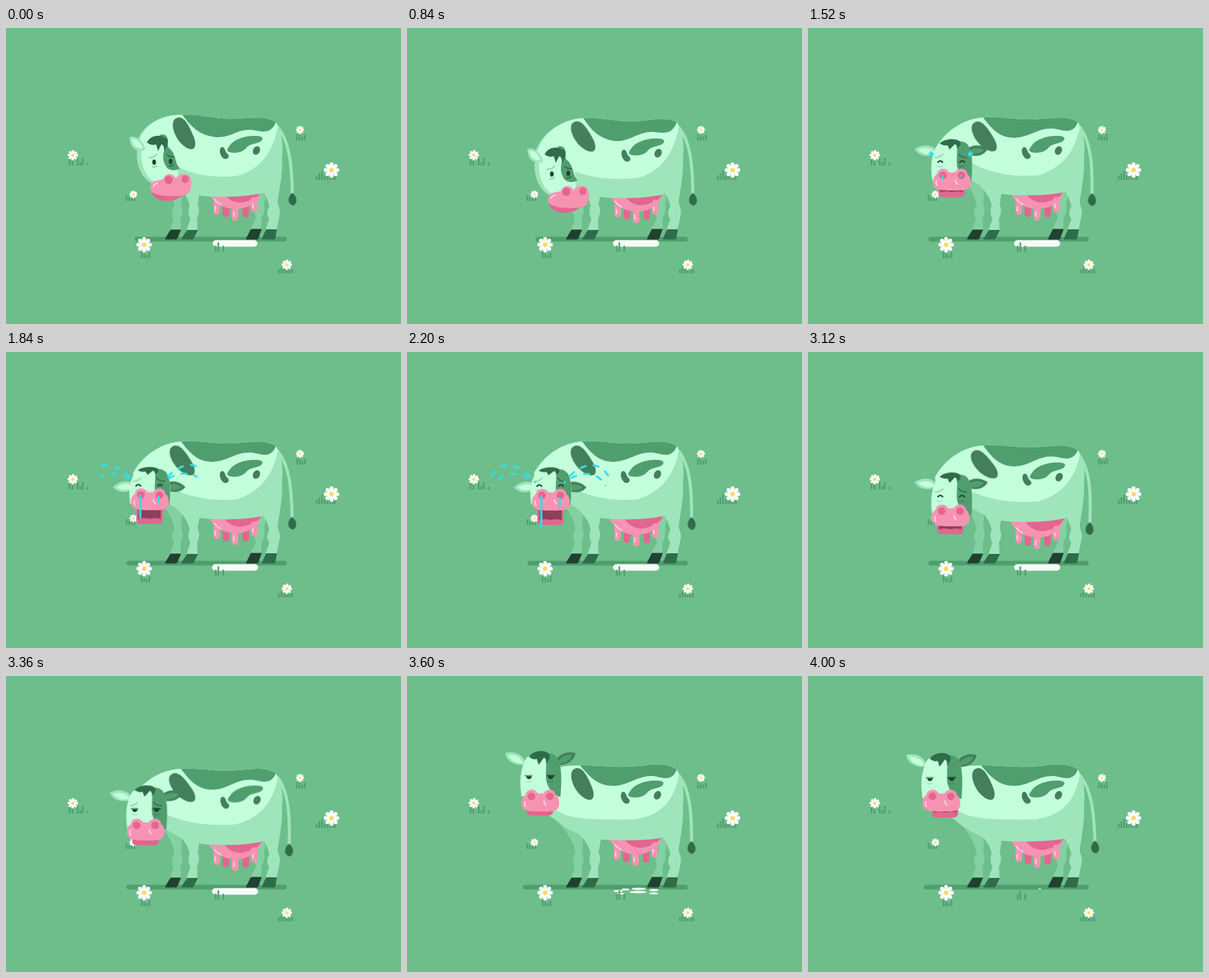
These frames come from a looping animation (600 px wide and 450 px high, 4.04 s). An HTML page without scripts:

```html
<!DOCTYPE html>
<html lang="en">
<head>
<meta charset="utf-8">
<title>Sad cow</title>
<style>
html, body { margin: 0; width: 100%; height: 100%; overflow: hidden; background: #6dbe8a; }
svg { display: block; width: 600px; height: 450px; }
:root { --light: #c4ffdc; --mid: #9fe5bb; --far: #83d1a3; --spot: #509e6e; --deep: #427f5a; --dark: #2f6c49; --ink: #20412f; --pink: #f693b3; --rose: #e2668f; --tear: #2fe0ea; }
.light { fill: var(--light); } .mid { fill: var(--mid); } .far { fill: var(--far); }
.spot { fill: var(--spot); } .deep { fill: var(--deep); } .dark { fill: var(--dark); } .ink { fill: var(--ink); }
.pink { fill: var(--pink); } .rose { fill: var(--rose); } .milk { fill: #f8fcf9; }
.line { fill: none; stroke-linecap: round; }
.grass { fill: none; stroke: var(--spot); stroke-width: 2.4; }
.shine { fill: none; stroke: #ffd3e2; stroke-width: 2; stroke-linecap: round; }

.anim, .anim * { animation: 0s ease-in-out infinite; }
.anim .a { animation-duration: 4.04s; }
.anim .step { animation-timing-function: step-end; }

/* body outline, lit flank and saddle share the same back curve */
.hull { animation-name: hull !important; }
.lit { animation-name: lit !important; }
.saddle { animation-name: saddle !important; }
@keyframes hull {
  0%, 13.9% { d: path("M410 143C388 130 362 140 335 138C310 136 290 131 268 132C237 131 209 146 200 170C194 195 215 230 247 236C262 244 275 254 305 256C345 258 375 255 392 250C414 245 427 190 416 154Z"); }
  20.8% { d: path("M410 143C388 132 362 144 335 142C310 141 290 136 268 137C237 138 205 158 195 188C190 212 215 236 247 242C262 248 275 256 305 258C345 260 375 257 392 252C414 247 427 190 416 154Z"); }
  27.7%, 70.3% { d: path("M410 143C388 130 362 140 335 139C310 139 290 134 266 136C241 138 212 151 193 184C190 206 215 226 247 231C262 239 275 251 305 253.500C345 256 375 253 392 249C414 245 427 190 416 154Z"); }
  77.2%, 81.7% { d: path("M410 149C388 136 362 146 335 145C310 145 290 140 266 142C241 144 212 157 193 190C190 214 215 232 247 236C262 244 275 255 305 257.500C345 260 375 257 392 252C414 247 427 194 416 159Z"); }
  87%, 90% { d: path("M410 142C388 128 362 138 335 138C310 139 290 136 263 136C235 136 205 140 195 165C192 190 203 206 222 216C240 232 265 247 300 249C345 251 375 249 392 245C414 241 427 190 416 154Z"); }
  99%, 100% { d: path("M410 142C388 128 362 138 335 138C310 139 290 136 263 136C235 136 205 140 195 165C192 190 203 206 222 218C240 234 265 249 300 251C345 253 375 250 392 247C414 242 427 190 416 154Z"); }
}
@keyframes lit {
  0%, 13.9% { d: path("M410 143C388 130 362 140 335 138C310 136 290 131 268 132C237 131 211 146 203 170C200 190 225 205 258 209C285 224 315 228 350 225C382 217 405 193 413 150Z"); }
  20.8% { d: path("M410 143C388 132 362 144 335 142C310 141 290 136 268 137C237 138 207 158 198 188C198 205 225 215 258 219C285 229 315 231 350 228C382 220 405 194 413 150Z"); }
  27.7%, 70.3% { d: path("M410 143C388 130 362 140 335 139C310 139 290 134 266 136C241 138 212 151 193 184C195 198 225 204 250 206C280 222 315 227 350 224C382 214 405 192 413 150Z"); }
  77.2%, 81.7% { d: path("M410 149C388 136 362 146 335 145C310 145 290 140 266 142C241 144 212 157 193 190C195 206 225 211 250 213C280 226 315 230 350 227C382 218 405 196 413 156Z"); }
  87%, 100% { d: path("M410 142C388 128 362 138 335 138C310 139 290 136 263 136C235 136 205 140 195 165C195 190 212 200 230 206C250 219 300 219 345 218C384 213 405 192 413 150Z"); }
}
@keyframes saddle {
  0%, 13.9% { d: path("M268 132C290 131 310 136 335 138C362 140 388 130 410 143C402 163 388 157 374 155C352 153 342 167 320 166C296 164 282 152 268 132Z"); }
  20.8% { d: path("M268 137C290 136 310 141 335 142C362 144 388 132 410 143C402 164 388 159 374 158C352 157 340 172 318 172C294 170 280 156 268 137Z"); }
  27.7%, 70.3% { d: path("M266 136C290 134 310 139 335 139C362 140 388 130 410 143C402 163 388 155 374 153C350 151 338 166 314 167C290 167 278 152 266 136Z"); }
  77.2%, 81.7% { d: path("M266 142C290 140 310 145 335 145C362 146 388 136 410 149C402 168 388 161 374 159C350 157 338 173 314 174C290 174 278 158 266 142Z"); }
  87%, 100% { d: path("M263 136C290 136 310 139 335 138C362 138 388 128 410 142C402 162 388 154 374 152C350 151 338 166 314 167C290 167 278 154 263 136Z"); }
}
.neckspot { animation-name: neckspot !important; }
@keyframes neckspot {
  0%, 13.9% { transform: translate(0, 0); }
  20.8% { transform: translate(-3px, 5px) rotate(-6deg); }
  27.7%, 70.3% { transform: translate(-3px, 5px) rotate(-8deg); }
  77.2%, 81.7% { transform: translate(-3px, 11px) rotate(-14deg); }
  87%, 100% { transform: translate(-4px, 4px); }
}
.spots { animation-name: spots !important; }
@keyframes spots {
  0%, 13.9%, 27.7%, 70.3% { transform: translate(0, 0); }
  20.8%, 77.2%, 81.7% { transform: translate(1px, 4px); }
  87%, 100% { transform: translate(0, -5px); }
}
.udder { animation-name: udder !important; }
@keyframes udder {
  0%, 13.9% { transform: translate(0, 0); }
  20.8% { transform: translate(0, 4px); }
  27.7%, 42.6% { transform: translate(0, 0); }
  54.5% { transform: translate(0, 3px); }
  70.3% { transform: translate(0, 1px); }
  77.2%, 81.7% { transform: translate(0, 7px); }
  86% { transform: translate(0, -7px); }
  89.1% { transform: translate(-1px, -4px); }
  93.1% { transform: translate(0, 1px); }
  99%, 100% { transform: translate(0, -1px); }
}
.tail { transform-origin: 414px 152px; animation-name: tail !important; }
@keyframes tail {
  0% { transform: rotate(0deg); } 9% { transform: rotate(1.8deg); }
  20.8% { transform: rotate(.4deg); } 26% { transform: rotate(-1.2deg); }
  37.6% { transform: rotate(2deg); } 46% { transform: rotate(.2deg); }
  54.5% { transform: rotate(1.5deg); } 65% { transform: rotate(-.8deg); }
  77.2% { transform: rotate(3.7deg) translateY(7px); } 89.1% { transform: rotate(1.6deg); }
  95% { transform: rotate(-1.2deg); } 99%, 100% { transform: rotate(-.5deg); }
}

.shade { animation-name: shade !important; }
@keyframes shade {
  0% { x: 195.5px; width: 231px; } 24.8% { x: 183px; width: 243.5px; } 85% { x: 176px; width: 250.5px; }
}
.pool { transform-origin: 348px 327px; animation-name: pool !important; }
@keyframes pool {
  0% { transform: scaleX(1); opacity: 1; } 13.9%, 84% { transform: scaleX(1.03); opacity: 1; }
  84.01%, 100% { opacity: 0; }
}
.bits ellipse { transform-box: fill-box; transform-origin: center; animation-name: bits; }
@keyframes bits {
  0%, 83.9% { transform: scale(0); } 84% { transform: scale(1.25, 1.8); }
  89.1% { transform: scale(1); } 98%, 100% { transform: scale(0); }
}
.bits .last { animation-name: last; }
@keyframes last {
  0%, 83.9% { transform: scale(0); } 84% { transform: scale(1.25, 1.8); }
  89.1% { transform: scale(1); } 99%, 100% { transform: scale(.2, .5); }
}

/* side head looks down, then turns to the front */
.side { animation-name: side !important; }
@keyframes side {
  0% { transform: translate(0, 0); } 6% { transform: translate(0, 2px); } 13.9% { transform: translate(0, 1px); }
  20.8% { transform: translate(-5px, 18px); } 23.8%, 100% { transform: translate(-11px, 24px); }
}
.showside { animation-name: showside !important; }
.showfront { animation-name: showfront !important; }
@keyframes showside { 0% { visibility: visible; } 23.8%, 100% { visibility: hidden; } }
@keyframes showfront { 0% { visibility: hidden; } 23.8%, 100% { visibility: visible; } }

.front { animation-name: front !important; }
@keyframes front {
  0%, 23.7% { transform: translate(25px, 60px); } 27.7% { transform: translate(16px, 57px); }
  32% { transform: translate(15px, 51px); } 37.6% { transform: translate(15px, 47px); }
  42.6% { transform: translate(15px, 50px); } 46.5% { transform: translate(15px, 46px); }
  50.5% { transform: translate(15px, 49px); } 54.5% { transform: translate(15px, 47px); }
  58.4% { transform: translate(15px, 50px); } 62.4% { transform: translate(15px, 46px); }
  66.3% { transform: translate(15px, 49px); } 70.3% { transform: translate(15px, 48px); }
  77.2% { transform: translate(15px, 63px); } 81.7% { transform: translate(14px, 65px); }
  86.1% { transform: translate(-1px, -10px); } 89.1% { transform: translate(0, -3px); }
  93.1% { transform: translate(0, 2px); } 99%, 100% { transform: translate(0, 0); }
}
.skull { transform-origin: 203px 180px; animation-name: skull !important; }
@keyframes skull {
  0%, 37.6% { transform: scaleY(.92); } 42.6%, 70.3% { transform: scaleY(.82); }
  77.2%, 81.7% { transform: scaleY(.95); } 86%, 100% { transform: scaleY(1); }
}
.hair { transform-origin: 203px 117px; animation-name: hair !important; }
@keyframes hair {
  0%, 37.6% { transform: scaleY(.82); } 42.6%, 70.3% { transform: scaleY(.7); }
  77.2%, 81.7% { transform: scaleY(.8); } 86%, 100% { transform: scaleY(1); }
}
.ear { transform-origin: 178px 137px; animation-name: ear !important; }
@keyframes ear {
  0%, 37.6% { transform: translate(2px, 6px) rotate(-20deg); }
  42.6%, 70.3% { transform: translate(3px, 22px) rotate(-30deg); }
  77.2%, 81.7% { transform: translate(2px, 4px) rotate(-20deg); }
  86.1% { transform: rotate(5deg); } 89.1%, 100% { transform: rotate(0deg); }
}
.muzzle { animation-name: muzzle !important; }
@keyframes muzzle {
  0%, 37.6% { transform: translate(1px, -6px); } 42.6%, 70.3% { transform: translate(1px, -12px); }
  77.2%, 81.7% { transform: translate(-1px, -4px); } 86% { transform: translate(0, 0); }
  89.1% { transform: translate(0, 3px); } 99%, 100% { transform: translate(0, 0); }
}
.jaw { animation-name: jaw !important; }
@keyframes jaw {
  0%, 37.6% { transform: translate(0, 3px); } 42.6% { transform: translate(0, 12px); }
  48% { transform: translate(0, 15px); } 51% { transform: translate(0, 13px); }
  54.5% { transform: translate(0, 15px); } 62% { transform: translate(0, 12px); }
  70.3% { transform: translate(0, 14px); } 77.2% { transform: translate(0, 5px); }
  86%, 89.1% { transform: translate(0, -1px); } 93% { transform: translate(-3px, 1px); }
  99%, 100% { transform: translate(6px, 2px); }
}
.open { animation-name: open !important; }
.shut { animation-name: shut !important; }
.sad { animation-name: sad !important; }
@keyframes open { 0% { opacity: 1; } 29.7% { opacity: 0; } 80.2%, 100% { opacity: 1; } }
@keyframes shut { 0% { opacity: 0; } 29.7% { opacity: 1; } 80.2%, 100% { opacity: 0; } }
@keyframes sad { 0% { opacity: 1; } 84%, 100% { opacity: 0; } }

.jet { fill: none; stroke: var(--tear); stroke-width: 3; stroke-linecap: round; stroke-dasharray: 8 12; }
.anim .jet { animation: flow .404s linear infinite; }
@keyframes flow { from { stroke-dashoffset: 20; } to { stroke-dashoffset: 0; } }
.reveal { fill: none; stroke: #fff; stroke-width: 9; stroke-dasharray: 100 300; animation: reveal 4.04s linear infinite; }
@keyframes reveal {
  0%, 35% { stroke-dashoffset: 101; } 37.6%, 42% { stroke-dashoffset: 84; }
  47%, 69% { stroke-dashoffset: 0; } 74%, 100% { stroke-dashoffset: -101; }
}
.drip { transform-origin: 188px 182px; animation-name: drip !important; }
@keyframes drip {
  0%, 35% { transform: scaleY(0); visibility: hidden; } 37.6% { transform: scaleY(.16); visibility: visible; }
  42% { transform: scaleY(.25); } 48% { transform: scaleY(.95); } 54.5%, 70.3% { transform: scaleY(1); visibility: visible; }
  75%, 100% { transform: scaleY(0); visibility: hidden; }
}
</style>
</head>
<body>
<svg class="anim" viewBox="0 0 600 450">
  <defs>
    <g id="flower">
      <circle r="7.300" pathLength="8" fill="none" stroke="#fff" stroke-width="5" stroke-linecap="round" stroke-dasharray="0 1"/>
      <circle r="6" fill="#fff"/>
      <circle r="2.900" fill="#fbd96b"/>
    </g>
    <path id="ear" d="M180 138C180 124 164 116 149 120C151 133 164 140 180 138Z"/>
    <path id="earin" d="M176 136C174 127 164 122 154 123C157 132 166 136 176 136Z"/>
    <path id="arcA" pathLength="100" d="M180 151C166 132 132 107 111 145"/>
    <path id="arcB" pathLength="100" d="M180 152C166 138 132 128 117 157"/>
    <mask id="stream" maskUnits="userSpaceOnUse" x="90" y="90" width="110" height="90">
      <use href="#arcA" class="reveal"/><use href="#arcB" class="reveal"/>
    </mask>
    <g id="jets" mask="url(#stream)">
      <path class="jet" d="M180 151C166 132 132 107 111 145"/>
      <path class="jet" d="M180 152C166 138 132 128 117 157"/>
    </g>
  </defs>

  <rect width="600" height="450" fill="#6dbe8a"/>

  <g class="grass">
    <path d="M96.500 198v11M101 201v8M109 198v11M113 204v5M116.500 198v11M124 205v4"/>
    <path d="M442 162v9M446 163v8M450 165v6M454 162v9"/>
    <path d="M472 225v6M476 221v10M480 217v14M484 224v7M488 221v10M492 225v6M496 222v9M499.500 225v6"/>
    <path d="M183 254v9M187 257v6M191 256v7M195 257v6"/>
    <path d="M414.500 367v6M418.500 364v9M422.500 366v7M426.500 366v7M430.500 368v5M434.500 366v7"/>
  </g>
  <use href="#flower" transform="translate(101.500 193.500) scale(.82)"/>
  <use href="#flower" transform="translate(446.500 154.800) scale(.64)"/>
  <use href="#flower" transform="translate(494.500 216) scale(1.2)"/>
  <use href="#flower" transform="translate(193.500 253) scale(.63)"/>
  <use href="#flower" transform="translate(426.500 360) scale(.82)"/>

  <rect class="a step shade spot" x="195.500" y="317.500" width="231" height="7" rx="3.500"/>
  <rect class="a pool milk" x="314" y="322.500" width="68" height="10" rx="5"/>
  <g class="bits milk">
    <ellipse class="a" cx="321" cy="327" rx="7" ry="1.700"/>
    <ellipse class="a" cx="332" cy="324.500" rx="6" ry="1.600"/>
    <ellipse class="a last" cx="352" cy="323.500" rx="11" ry="1.700"/>
    <ellipse class="a" cx="375" cy="325.500" rx="7" ry="1.800"/>
    <ellipse class="a" cx="351" cy="328.500" rx="13" ry="1.800"/>
    <ellipse class="a" cx="325" cy="331" rx="6" ry="1.300"/>
    <ellipse class="a" cx="375" cy="330.500" rx="7" ry="1.500"/>
  </g>
  <path class="grass" d="M318.500 331v9M322.500 326v14M330 331v9"/>

  <!-- tail and far legs -->
  <g class="a tail">
    <path class="line" stroke="#9fe5bb" stroke-width="4.500" d="M413 151C430 172 434 205 435 253"/>
    <path class="dark" d="M435 250.500C442 256 444 266 436.500 270C427 268 427 257 435 250.500Z"/>
  </g>
  <path class="far" d="M222 214L268 236L266 268C270 276 268 284 265 290L266 307H249L255 290C251 282 252 274 256 270C254 254 244 236 222 214Z"/>
  <path class="ink" d="M250 306.500H266L260 320.500Q259 321.500 257 321.500H243Q241 321.500 242 319.500Z"/>
  <path class="far" d="M376 240H398L392 266C394 276 391 284 388 290V306H371L380 289C376 281 378 276 382 270C384 262 382 256 376 240Z"/>
  <path class="ink" d="M372 305.500H388.500L383 320.500Q382.500 321.500 381 321.500H366Q364 321.500 365 319.500Z"/>

  <g class="a udder">
    <path class="line" stroke="#e2668f" stroke-width="10" d="M334 266V282.500M364 266V283"/>
    <path class="pink" d="M306 246C312 265 330 276 352 275C372 273 384 264 389 246Z"/>
    <path class="rose" d="M328 246C334 261 348 267 360 265C374 262 385 257 389 246Z"/>
    <path class="line" stroke="#f693b3" stroke-width="10" d="M320 266V279M348 272V288M377 262V275"/>
    <path class="shine" d="M316 260Q320 265 326 268M318 272V278M346 280V286M375 268V273"/>
  </g>

  <!-- near legs and body -->
  <path class="mid" d="M244 226L296 240L291 268C295 276 293 284 290 290L291 308H274L280 290C276 282 277 274 279 270C276 254 262 238 244 226Z"/>
  <path class="dark" d="M275 307H291.500L285 320.500Q284 321.500 282 321.500H268Q266 321.500 267 319.500Z"/>
  <path class="mid" d="M416 180C424 205 416 240 413 262C411 268 419 276 415 287L411 307H394L400 290C395 284 397 276 400 271C398 260 393 252 385 238Z"/>
  <path class="dark" d="M395 306H411.500L409 320Q408.500 321.500 406 321.500H390Q388 321.500 389 319.500Z"/>

  <path class="a hull mid" d="M410 143C388 130 362 140 335 138C310 136 290 131 268 132C237 131 209 146 200 170C194 195 215 230 247 236C262 244 275 254 305 256C345 258 375 255 392 250C414 245 427 190 416 154Z"/>
  <path class="a lit light" d="M410 143C388 130 362 140 335 138C310 136 290 131 268 132C237 131 211 146 203 170C200 190 225 205 258 209C285 224 315 228 350 225C382 217 405 193 413 150Z"/>
  <path class="a saddle spot" d="M268 132C290 131 310 136 335 138C362 140 388 130 410 143C402 163 388 157 374 155C352 153 342 167 320 166C296 164 282 152 268 132Z"/>
  <path class="a neckspot deep" style="transform-origin:270px 160px" d="M262 136C272 135 279 151 285 165C290 178 287 186 279 184C268 181 257 167 254 153C252 143 255 137 262 136Z"/>
  <g class="a spots deep">
    <path class="spot" d="M389 170C386 176 372 175 366 181C360 189 350 191 340 189C334 187 336 184 339 180C346 168 366 163 380 164C388 164 391 167 389 170Z"/>
    <path d="M328 181C333 181 332 187 336 191C341 195 337 200 332 199C325 196 322 183 328 181Z"/>
    <ellipse cx="380.500" cy="186" rx="5.200" ry="6.800" transform="rotate(28 380 186)"/>
  </g>

  <!-- side head -->
  <g class="a step showside"><g class="a side">
    <path class="mid" d="M200 178C196 200 201 226 224 238L246 238L238 172Z"/>
    <path class="light" d="M207 174C203 196 205 222 228 236L262 234L260 200L245 168Z"/>
    <path class="mid" d="M212 184C206 167 194 163 188 166C187 179 196 188 208 187Z"/>
    <path class="light" d="M208 183C204 172 197 168 191 169C192 178 198 184 208 183Z"/>
    <path class="spot" d="M234 162C250 159 244 176 247 182C256 188 257 200 260 208L264 214C258 217 250 217 245 213C237 203 238 192 241 184Z"/>
    <path class="dark" d="M214 174C220 162 236 162 241 167C249 165 246 181 240 188C241 181 239 177 236 177L231 187L228 177C222 179 218 177 214 174Z"/>
    <g class="ink"><ellipse cx="225" cy="204" rx="2.800" ry="4"/><ellipse cx="250" cy="203" rx="2.800" ry="4"/></g>
    <g class="line" stroke-width="1.800">
      <path stroke="#83d1a3" d="M218 197Q225 197 229 192M222 211Q226 212 229 210"/>
      <path stroke="#2f6c49" d="M245 193Q249 196 255 196M248 210Q252 210 254 208"/>
    </g>
    <path class="rose" d="M220 244C221 269 262 267 270 251Z"/>
    <path class="pink" d="M219 243C219 231 232 232 239 230C241 220 254 220 258 229C262 220 280 219 281 231C283 246 279 254 266 255C246 257 219 255 219 243Z"/>
    <g class="rose"><ellipse cx="247" cy="231" rx="6" ry="6.300"/><ellipse cx="272" cy="230" rx="5.300" ry="6"/></g>
    <path class="shine" d="M224 241Q225 237 230 236"/>
  </g></g>

  <!-- front head -->
  <g class="a step showfront"><g class="a front">
    <g class="a ear"><use href="#ear" class="mid"/><use href="#earin" class="light"/></g>
    <g transform="matrix(-1 0 0 1 405 0)"><g class="a ear"><use href="#ear" class="deep"/><use href="#earin" class="spot"/></g></g>
    <g class="a skull">
      <path class="light" d="M174 186C170 160 173 142 181 128C188 119 219 117 228 127C236 140 236 165 232 186Z"/>
      <path class="spot" d="M212 121C222 119 229 124 232 136C235 150 235 165 233 187C222 184 211 172 211 155Z"/>
      <path class="a hair dark" d="M185 126C191 116 208 115 214 120C219 123 217 131 211 136C212 130 210 128 208 127L200 138L197 129C192 131 189 128 185 126Z"/>
    </g>
    <g class="a step open">
      <g class="ink"><path d="M181 155H189.500A4 4.500 0 0 1 181 155ZM214 155H222.500A4 4.500 0 0 1 214 155Z"/></g>
      <g class="line" stroke-width="1.800"><path stroke="#5fa27c" d="M179.500 154.500H190"/><path stroke="#204c39" d="M213 154.500H224"/></g>
    </g>
    <g class="a step shut line" stroke="#20412f" stroke-width="2.200">
      <path d="M182.500 157Q186 153 189.500 157M215.500 157Q219 153 222.500 157"/>
    </g>
    <g class="line" stroke-width="1.700">
      <path stroke="#9fe5bb" d="M181 163Q185 165 189 163"/>
      <path stroke="#3f8660" d="M214 163Q218 165 222 163"/>
      <g class="a step sad">
        <path stroke="#83d1a3" d="M178 150Q185 150 190 145"/><path stroke="#2f6c49" d="M214 145Q218 150 226 150"/>
      </g>
    </g>
    <use href="#jets"/>
    <use href="#jets" transform="matrix(-1 0 0 1 404 0)"/>
    <g class="a muzzle">
      <g class="a jaw">
        <rect class="rose" x="182" y="184" width="40" height="29" rx="6"/>
        <path fill="#8c4059" d="M185 185H219V205.500Q211 203 203 205.500Q194 203 185 205.500Z"/>
      </g>
      <path class="pink" d="M174 195C173 187 177 183 180 181C181 171 195 171 198 178C201 179 205 179 208 178C211 171 225 171 226 181C230 184 232 189 231 196C230 206 222 206 203 206C184 206 175 205 174 195Z"/>
      <g class="rose"><circle cx="189" cy="183" r="5.800"/><circle cx="217" cy="183" r="5.800"/></g>
      <path class="shine" d="M179 191Q178 195 180 198M208 190Q208 194 211 196"/>
      <g class="a drip line" stroke="#2fe0ea" stroke-width="3.200"><path d="M188 184V232M216 187V200"/></g>
    </g>
  </g></g>

  <path class="grass" d="M206 340v10M210 343v7M214 345v5M218 341v9"/>
  <use href="#flower" transform="translate(209.800 329.500) scale(1.2)"/>
</svg>
</body>
</html>
```
